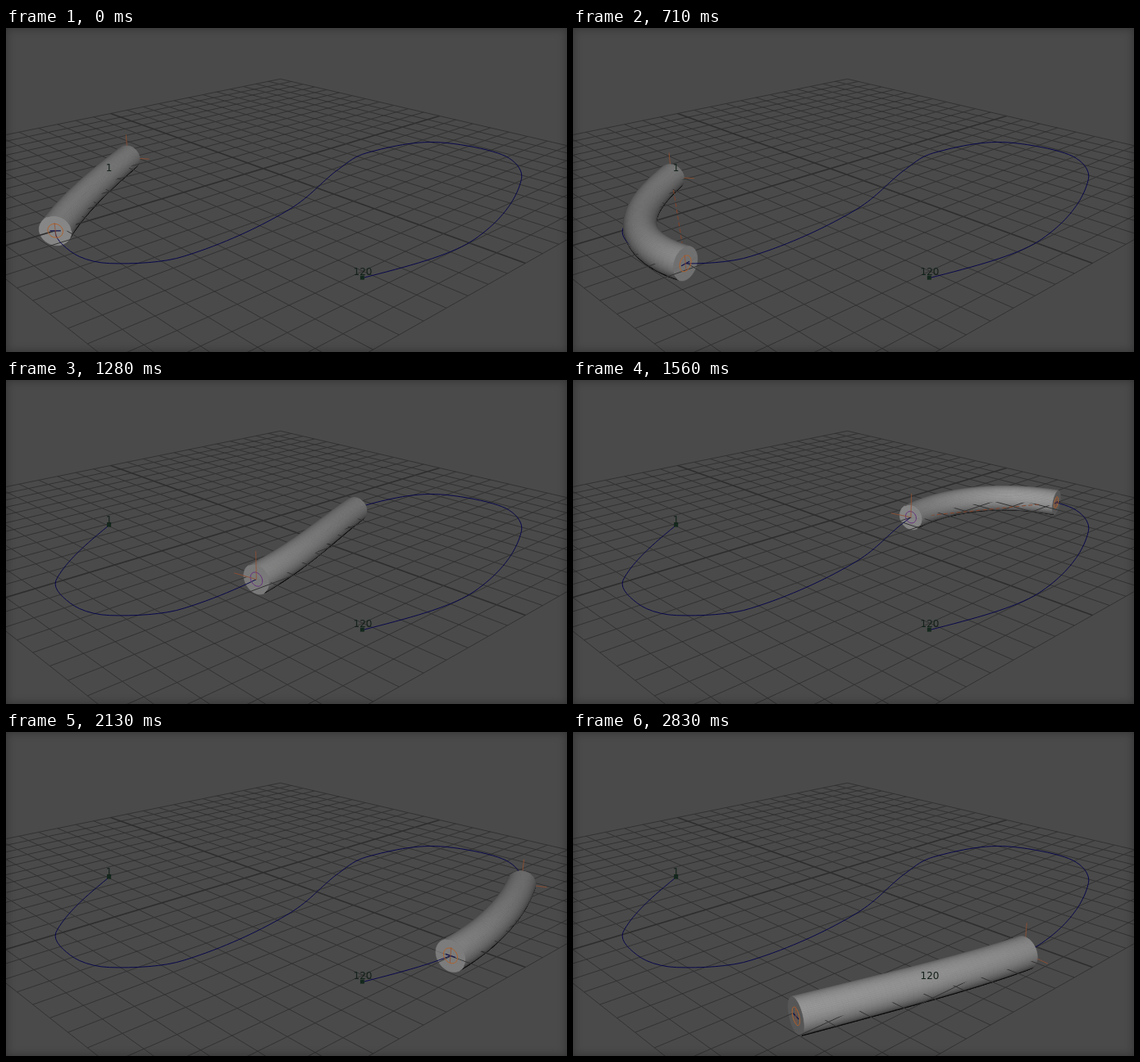
Write an HTML page with a canvas that moves like this. It is 684 by 396 pixels and loops after 2.93 s.

```html
<!DOCTYPE html>
<html lang="en">
<head>
<meta charset="utf-8">
<title>Tube flowing along a path</title>
<style>
  html, body { margin: 0; width: 100%; height: 100%; overflow: hidden; background: #4a4a4a; }
  canvas { display: block; }
  body::after { content: ""; position: fixed; inset: 0; box-shadow: inset 0 0 12px #0005; }
</style>
</head>
<body>
<canvas id="stage" width="684" height="396"></canvas>
<script>
const ctx = document.getElementById('stage').getContext('2d');
const LOOP = 2930, STEPS = 17, RADIUS = 0.045, RINGS = 48, SIDES = 32, CELLS = 12, SECTIONS = 4;
const CAMERA = [1.86, -1.62, 0.86];

// Key points of the motion path on the ground plane; the grid spans -1..1.
const KNOTS = [
  [-.32, -.412], [-.02, -.759], [.162, -.808], [.283, -.771], [.379, -.611],
  [.335, -.202], [.181, .184], [.127, .392], [.21, .672], [.47, .73],
  [.659, .55], [.829, .028], [.774, -.362]
];
const LAST = KNOTS.length - 1;

const add = (a, b, k = 1) => a.map((c, i) => c + b[i] * k);
const mix = (a, b, k) => a.map((c, i) => c + (b[i] - c) * k);
const dot = (a, b) => a.reduce((sum, c, i) => sum + c * b[i], 0);
const unit = a => a.map(c => c / Math.hypot(...a));
const toCamera = p => add(CAMERA, p, -1);

const dist = [0];
for (let i = 1; i <= LAST; i++)
  dist[i] = dist[i - 1] + Math.hypot(...add(KNOTS[i], KNOTS[i - 1], -1));
const LENGTH = dist[LAST];

const chord = (a, b) => add(KNOTS[b], KNOTS[a], -1).map(c => c / (dist[b] - dist[a]));
const slopes = KNOTS.map((_, i) =>
  i === 0 ? mix(chord(0, 1), chord(0, 2), -.5) :
  i === LAST ? mix(chord(LAST - 1, LAST), chord(LAST - 2, LAST), -.5) :
  chord(i - 1, i + 1));

// Smooth curve through the knots, continued straight past both ends.
function pathAt(s) {
  const d = Math.min(Math.max(s, 0), LENGTH);
  let i = 0;
  while (i < LAST - 1 && dist[i + 1] < d) i++;
  const h = dist[i + 1] - dist[i], x = (d - dist[i]) / h;
  const w = x * x * (3 - 2 * x), m0 = x * (1 - x) ** 2 * h, m1 = x * x * (x - 1) * h;
  const end = slopes[s < 0 ? 0 : LAST];
  return KNOTS[i].map((c, k) => c * (1 - w) + KNOTS[i + 1][k] * w
    + slopes[i][k] * m0 + slopes[i + 1][k] * m1 + end[k] * (s - d));
}

function project([u, v, h = 0]) {
  const w = 1 - .2644 * u + .2412 * v - .1357 * h;
  return [(313.1 + 152.5 * u + 342.3 * v - 47.9 * h) / w,
          (171.3 + 39.8 * u - 38.5 * v - 359.8 * h) / w];
}

function trace(points) {
  ctx.beginPath();
  points.forEach(p => ctx.lineTo(...project(p)));
}

function line(points, color, width = 1) {
  trace(points);
  ctx.strokeStyle = color;
  ctx.lineWidth = width;
  ctx.stroke();
}

function drawGrid() {
  for (let i = -CELLS; i <= CELLS; i++) {
    const k = i / CELLS, style = i ? ['#323232', 1] : ['#2e2e2e', 1.8];
    line([[k, -1], [k, 1]], ...style);
    line([[-1, k], [1, k]], ...style);
  }
}

function drawPath() {
  line(Array.from({ length: 161 }, (_, i) => pathAt(LENGTH * i / 160)), '#08084c');
  ctx.fillStyle = '#14281d';
  for (const p of [KNOTS[0], KNOTS[LAST]]) {
    const [x, y] = project(p);
    ctx.fillRect(x - 2.5, y - 3, 5, 5);
  }
}

// The tube eases along the path and is stretched a little early on.
function buildRings(step) {
  const x = step / STEPS, p = x + x * (1 - x) ** 2 / 2;
  const middle = .16 + 3.62 * p * p * (3 - 2 * p);
  const size = .65 + 2 * x * (1 - x) ** 6;
  const lattice = Array.from({ length: SECTIONS + 1 }, (_, i) =>
    pathAt(middle + size * (i / SECTIONS - .5)));

  // Bezier blend of the lattice sections, so the tube cuts tight corners.
  const center = k => {
    let pts = lattice;
    while (pts.length > 1) pts = pts.slice(1).map((q, i) => mix(pts[i], q, k));
    return pts[0];
  };
  return Array.from({ length: RINGS + 1 }, (_, i) => {
    const k = i / RINGS;
    const [tu, tv] = unit(add(center(k + .01), center(k - .01), -1));
    return { center: [...center(k), 0], along: [tu, tv, 0], side: [-tv, tu, 0] };
  });
}

const spoke = (ring, a) => add(ring.side.map(c => c * Math.cos(a)), [0, 0, Math.sin(a)]);
const rim = (ring, a, r = RADIUS) => add(ring.center, spoke(ring, a), r);
const arc = (ring, from, to, r) =>
  Array.from({ length: SIDES + 1 }, (_, i) => rim(ring, from + (to - from) * i / SIDES, r));

function shade(normal, p) {
  const glow = dot(normal, unit(add(toCamera(p), [0, 0, .6])));
  const c = Math.round(glow < 0 ? 12 : 60 + 95 * glow);
  return `rgb(${c},${c},${c})`;
}

// One half of the tube: above the ground (from = 0) or below it (from = PI).
function drawHalf(rings, ends, from) {
  const faces = [], step = Math.PI / SIDES;
  const push = (points, normal, mid) => {
    const sight = toCamera(mid);
    if (dot(normal, sight) > 0)
      faces.push({ points, color: shade(normal, mid), far: Math.hypot(...sight) });
  };
  for (let i = 0; i < RINGS; i++)
    for (let j = 0; j < SIDES; j++) {
      const a = from + j * step, b = a + step, p = rings[i], q = rings[i + 1];
      push([rim(p, a), rim(p, b), rim(q, b), rim(q, a)], spoke(p, a + step / 2), rim(p, a + step / 2));
    }
  for (const { ring, out } of ends)
    push(arc(ring, from, from + Math.PI), out, ring.center);
  faces.sort((a, b) => b.far - a.far);
  for (const f of faces) {
    trace(f.points);
    ctx.closePath();
    ctx.fillStyle = ctx.strokeStyle = f.color;
    ctx.lineWidth = .6;
    ctx.fill();
    ctx.stroke();
  }
}

function drawHandle({ ring, isHead, facing }) {
  const c = ring.center, orange = '#955030';
  if (facing) line(arc(ring, 0, 2 * Math.PI, .021), isHead ? '#b0622c' : '#65307c');
  if (isHead) {
    if (!facing) return;
    line([add(c, ring.side, -.015), add(c, ring.side, .015)], '#10104a', 1.2);
    line([add(c, [0, 0, -.02]), add(c, [0, 0, .024])], orange, .8);
  } else {
    line([c, add(c, [0, 0, .085])], orange, .8);
    line([c, add(c, ring.side, .08)], orange, .8);
  }
}

function draw(step) {
  const rings = buildRings(step), first = rings[0], last = rings[RINGS];
  const ends = [
    { ring: first, out: first.along.map(c => -c), isHead: false },
    { ring: last, out: last.along, isHead: true }
  ];
  for (const e of ends) e.facing = dot(e.out, toCamera(e.ring.center)) > 0;

  ctx.setTransform(1, 0, 0, 1, 0, 0);
  ctx.fillStyle = '#4a4a4a';
  ctx.fillRect(0, 0, 684, 396);
  ctx.translate(.5, .5);
  drawHalf(rings, ends, Math.PI);
  drawGrid();
  drawPath();
  ctx.setLineDash([5, 3]);
  line([first.center, last.center], '#8a4226', .9);
  ctx.setLineDash([]);
  ends.filter(e => !e.facing).forEach(drawHandle);
  drawHalf(rings, ends, 0);
  ends.filter(e => e.facing).forEach(drawHandle);

  ctx.font = '12px "DejaVu Sans", sans-serif';
  ctx.textAlign = 'center';
  ctx.fillStyle = '#14221a';
  ctx.fillText('1', 125, 174);
  ctx.fillText('120', 434.5, 301.5);
}

// Two long holds, then an even stepping rate.
const stepAt = t => Math.max(t < 430 ? 0 : 1, Math.floor((t - 708) / 141.2) + 2);

let shown;
function tick() {
  const step = stepAt(performance.now() % LOOP);
  if (step !== shown) draw(shown = step);
  requestAnimationFrame(tick);
}
tick();
</script>
</body>
</html>
```
